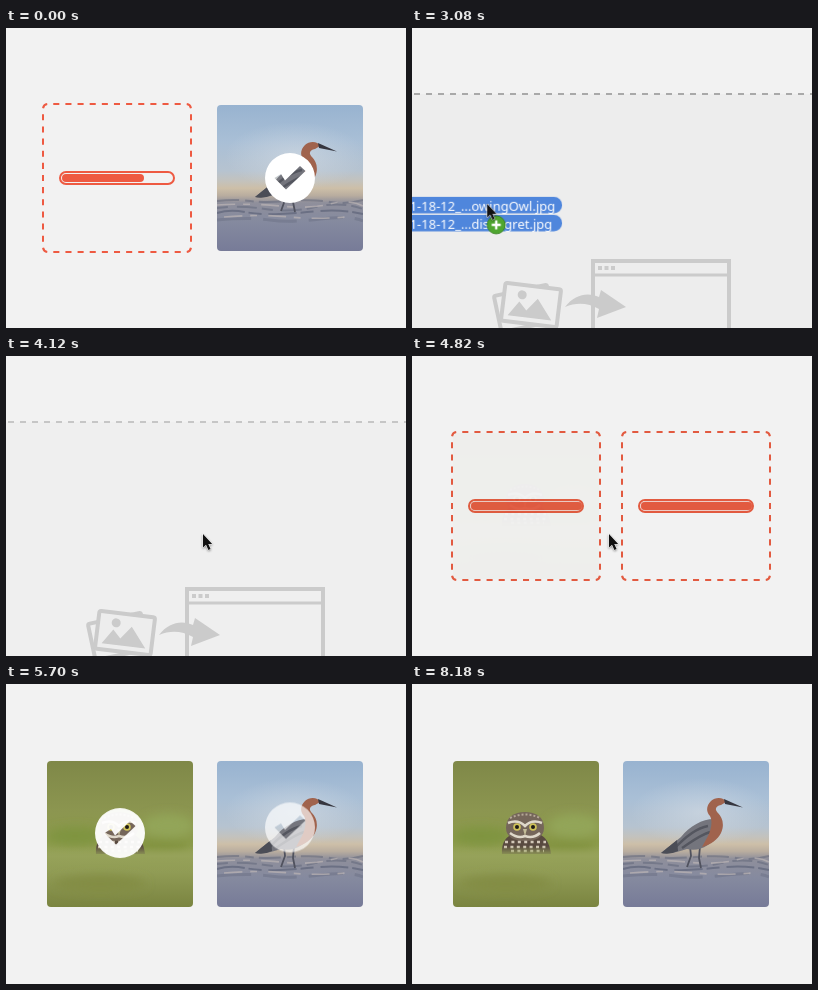
Write an HTML page that moves like this. It is 400 by 300 pixels and loops after 8.32 s.

```html
<!DOCTYPE html>
<html lang="en">
<head>
<meta charset="utf-8">
<title>Drag and drop upload</title>
<style>
  html, body { margin: 0; width: 100%; height: 100%; overflow: hidden; background: #f2f2f2; }
  svg { display: block; width: 400px; height: 300px; }
  text { font: 13px "Noto Sans", "Open Sans", sans-serif; fill: #fff; }

  .tile { --red: #e25a40; }
  .poster { --red: #ee5a42; }
  .outline { fill: none; stroke: var(--red); stroke-width: 2; }
  .dash { stroke-dasharray: 6 6; stroke-dashoffset: 6.8; }
  .fill { fill: var(--red); }
  .tile .fill { stroke: var(--red); stroke-width: .5; }
  .tile .dash { stroke: #d65f45; }

  .poster, .zone, .hint, .pointer, .drag, .slide, .frame, .photo, .mark, .tile .fill {
    animation: 8320ms linear infinite both;
  }
  .late * { animation-delay: 140ms; }

  .poster { animation-name: poster; }
  .zone { animation-name: zone; }
  .hint { animation-name: hint; }
  .pointer { animation-name: pointer; }
  .drag { animation-name: drag; }
  .slide { animation-name: slide; }
  .frame { animation-name: frame; }
  .photo { animation-name: photo; }
  .mark { animation-name: mark; }
  .tile .fill { animation-name: fill; }

  @keyframes poster {
    0%, 31% { opacity: 1; }
    31.01% { opacity: .93; }
    34.86%, 100% { opacity: 0; }
  }
  @keyframes zone {
    0%, 32.5% { opacity: 0; }
    35.82%, 48.56% { opacity: 1; }
    50.96%, 100% { opacity: 0; }
  }
  @keyframes hint {
    0%, 32.5% { opacity: 0; }
    35.82%, 50.96% { opacity: 1; }
    52.88%, 100% { opacity: 0; }
  }
  @keyframes pointer {
    0%, 31.01% { transform: translate(-90px, 240px); animation-timing-function: cubic-bezier(.3, .2, .5, 1); }
    43.03% { transform: translate(152px, 146px); animation-timing-function: ease-in-out; }
    48.08%, 61.3% { transform: translate(197px, 178px); opacity: 1; }
    62.98%, 100% { transform: translate(197px, 178px); opacity: 0; }
  }
  @keyframes drag {
    0%, 48.07% { opacity: 1; }
    48.08%, 100% { opacity: 0; }
  }
  @keyframes slide {
    0%, 50.48% { transform: translateY(40px); opacity: 0; animation-timing-function: ease-out; }
    52.88% { transform: translateY(-4px); opacity: 1; animation-timing-function: ease-in-out; }
    54.33%, 100% { transform: none; opacity: 1; }
  }
  @keyframes fill {
    0%, 52.16% { width: 8px; animation-timing-function: ease-in-out; }
    56.6%, 100% { width: 111px; }
  }
  @keyframes frame {
    0%, 61.3% { opacity: 1; }
    63.7%, 100% { opacity: 0; }
  }
  @keyframes photo {
    0%, 57.7% { opacity: 0; }
    64.66%, 100% { opacity: 1; }
  }
  @keyframes mark {
    0%, 64.78% { transform: translateY(-20px); opacity: 0; animation-timing-function: cubic-bezier(.5, 1, .89, 1); }
    69.59%, 85.34% { transform: none; opacity: 1; animation-timing-function: cubic-bezier(.11, 0, .5, 0); }
    89.9%, 100% { transform: translateY(20px); opacity: 0; }
  }
</style>
</head>
<body>
<svg viewBox="0 0 400 300">
  <defs>
    <clipPath id="crop"><rect x="-73" y="-73" width="146" height="146" rx="4"/></clipPath>
    <filter id="soft" x="-50%" y="-50%" width="200%" height="200%"><feGaussianBlur stdDeviation="5"/></filter>
    <filter id="fuzz" x="-20%" y="-20%" width="140%" height="140%"><feGaussianBlur stdDeviation=".6"/></filter>

    <linearGradient id="field" x2="0" y2="1">
      <stop offset="0" stop-color="#7f8848"/>
      <stop offset=".35" stop-color="#8c9650"/>
      <stop offset=".55" stop-color="#8b9a4a"/>
      <stop offset=".68" stop-color="#98a45c"/>
      <stop offset="1" stop-color="#7a8440"/>
    </linearGradient>
    <linearGradient id="grass" x2="0" y2="1">
      <stop offset="0" stop-color="#95a158" stop-opacity="0"/>
      <stop offset=".4" stop-color="#96a25a"/>
      <stop offset="1" stop-color="#8c974e" stop-opacity="0"/>
    </linearGradient>
    <linearGradient id="shore" x2="0" y2="1">
      <stop offset="0" stop-color="#98b3d0"/>
      <stop offset=".25" stop-color="#a9bfd6"/>
      <stop offset=".45" stop-color="#b6c3d0"/>
      <stop offset=".52" stop-color="#c3c2bd"/>
      <stop offset=".57" stop-color="#cdbfa8"/>
      <stop offset=".62" stop-color="#b9ad9f"/>
      <stop offset=".67" stop-color="#8f8f9b"/>
      <stop offset=".8" stop-color="#858a9f"/>
      <stop offset="1" stop-color="#777b98"/>
    </linearGradient>
    <radialGradient id="haze">
      <stop offset="0" stop-color="#d8dfe6" stop-opacity=".55"/>
      <stop offset="1" stop-color="#d8dfe6" stop-opacity="0"/>
    </radialGradient>

    <g id="owl" clip-path="url(#crop)">
      <rect x="-73" y="-73" width="146" height="146" fill="url(#field)"/>
      <g filter="url(#soft)">
        <ellipse cx="-45" cy="2" rx="28" ry="9" fill="#7f9440"/>
        <ellipse cx="48" cy="-8" rx="26" ry="12" fill="#93a558"/>
        <ellipse cx="40" cy="12" rx="30" ry="7" fill="#82933f"/>
        <ellipse cx="-20" cy="50" rx="46" ry="9" fill="#838d45"/>
      </g>
      <g filter="url(#fuzz)">
        <path d="M-24 20C-25 6-18-2 0-2S23 6 25 20Z" fill="#594a40"/>
        <path d="M-20-6C-20-17-12-22-1-22S18-17 18-6C18 3 10 7-1 7S-20 3-20-6Z" fill="#75665a"/>
        <path d="M-16-16Q-1-23 14-16" fill="none" stroke="#b5a897" stroke-width="2" stroke-dasharray="2 2"/>
        <path d="M-18-11Q-8-15-1-8Q6-15 16-11M-16-1Q-8 5-1 2Q7 5 14-1" fill="none" stroke="#dfd8ca" stroke-width="2.6"/>
        <path d="M-21 8H20M-22 13H22M-15 17H18" stroke="#d3c8b9" stroke-width="2.4" stroke-dasharray="3 3.4"/>
        <circle cx="-9" cy="-7" r="3.8" fill="#cfc25a"/><circle cx="7" cy="-7" r="3.8" fill="#cfc25a"/>
        <circle cx="-9" cy="-7" r="2" fill="#1d1a17"/><circle cx="7" cy="-7" r="2" fill="#1d1a17"/>
        <path d="M-3-5H1L-1 2Z" fill="#c3bc98"/>
      </g>
      <rect x="-73" y="12" width="146" height="26" fill="url(#grass)"/>
    </g>

    <g id="egret" clip-path="url(#crop)">
      <rect x="-73" y="-73" width="146" height="146" fill="url(#shore)"/>
      <ellipse cx="5" cy="-22" rx="70" ry="34" fill="url(#haze)"/>
      <g fill="none" stroke="#5f6479" stroke-width="2" filter="url(#fuzz)">
        <path d="M-73 23Q-55 21-40 23T0 23T40 24T73 22" opacity=".5" stroke-dasharray="22 6 9 5"/>
        <path d="M-73 35Q-60 31-45 34T-10 36T30 33T73 36" opacity=".7" stroke-dasharray="28 4 13 7"/>
        <path d="M-73 30Q-50 27-25 31T25 29T73 31" opacity=".5" stroke-dasharray="11 9 20 5"/>
        <path d="M-73 42Q-40 39-20 42T30 41T73 43" opacity=".35" stroke-width="3" stroke-dasharray="34 12"/>
        <path d="M-73 27Q-40 25-10 28T40 26T73 28M-66 39Q-30 36 0 39T66 38" stroke="#bdb6b6" stroke-width="1.6" opacity=".7" stroke-dasharray="18 8 7 11"/>
      </g>
      <g filter="url(#fuzz)">
        <path d="M-6 12L-5 22L-9 33M4 12L3 24L5 34" fill="none" stroke="#50525e" stroke-width="1.8"/>
        <path d="M18-15C6-15-6-8-15 3L-35 19C-26 21-17 17-9 15C4 18 16 11 21 0Z" fill="#74757d"/>
        <path d="M12-8C0-6-12 4-23 16M14-2C4 1-5 8-14 14" fill="none" stroke="#54565f" stroke-width="2.4"/>
        <path d="M-19 6L-35 19Q-26 21-18 17Z" fill="#4b4d56"/>
        <path d="M30-32C28-37 19-37 15-33C10-28 10-22 14-18C17-13 15-4 12 2L6 13C15 11 22 5 25-1C29-10 26-17 22-21C18-25 20-28 25-29Z" fill="#a0634d"/>
        <path d="M28-35L47-26.5L29-30Z" fill="#36363f"/>
      </g>
    </g>

    <path id="tick" fill="#fff" fill-rule="evenodd"
      d="M-25 0A25 25 0 1 1 25 0A25 25 0 1 1-25 0ZM-15.5 0L-9-4L-5 2.5L10-12L15.5-7L-4 11.5Z"/>

    <g id="box">
      <rect class="outline dash" x="-74" y="-74" width="148" height="148" rx="5" pathLength="576"/>
      <rect class="outline" x="-57" y="-6" width="114" height="12" rx="6"/>
    </g>

    <g id="file">
      <path d="M-106-7.5H-98L-94-3.5V7.5H-106Z" fill="#fafafa" stroke="#a2a2a2"/>
      <path d="M-98-7.5V-3.5H-94" fill="none" stroke="#a2a2a2"/>
      <circle cx="-100" cy="2" r="3.4" fill="#6f8cae"/>
      <path d="M-103 3L-100 0L-98 4" fill="none" stroke="#333f50"/>
      <rect x="-90" y="-8" width="165" height="16.5" rx="8.2" fill="#4f86dc"/>
    </g>
  </defs>

  <rect width="400" height="300" fill="#f2f2f2"/>

  <g class="zone">
    <rect y="66" width="400" height="234" fill="#ededed"/>
    <path d="M2 66H400" stroke="#a9a9a9" stroke-width="2" stroke-dasharray="6 6"/>
  </g>

  <g class="hint" fill="none" stroke="#cbcbcb" stroke-width="4">
    <path d="M181 304V233H317V304"/>
    <path d="M181 247H317" stroke-width="3"/>
    <path d="M186 240H203" stroke-dasharray="4 2.5"/>
    <rect x="-27" y="-18" width="54" height="37" rx="2" transform="translate(112 280) rotate(-12)"/>
    <g transform="translate(119 277) rotate(7)">
      <rect x="-28" y="-19" width="56" height="38" rx="2" fill="#ededed"/>
      <path d="M-22 13L-12-2L-4 6L6-7L22 13Z" fill="#cbcbcb" stroke="none"/>
      <circle cx="-10" cy="-9" r="4.5" fill="#cbcbcb" stroke="none"/>
    </g>
    <path d="M153 279C163 266 176 264 187 269L189 262L214 279L185 290L187 281C176 275 165 274 153 279Z" fill="#cbcbcb" stroke="none"/>
  </g>

  <g class="tile" transform="translate(114 150)">
    <g class="slide"><g class="frame">
      <use href="#box"/>
      <rect class="fill" x="-55" y="-4" width="111" height="8" rx="4"/>
    </g></g>
    <use class="photo" href="#owl"/>
    <use class="mark" href="#tick"/>
  </g>
  <g class="tile late" transform="translate(284 150)">
    <g class="slide"><g class="frame">
      <use href="#box"/>
      <rect class="fill" x="-55" y="-4" width="111" height="8" rx="4"/>
    </g></g>
    <use class="photo" href="#egret"/>
    <use class="mark" href="#tick"/>
  </g>

  <g class="pointer">
    <g class="drag">
      <use href="#file" y="1"/>
      <text x="-85" y="6.5">11-18-12_...owingOwl.jpg</text>
      <use href="#file" y="19"/>
      <text x="-85" y="24.5">11-18-12_...dishEgret.jpg</text>
      <circle cx="9" cy="21" r="9" fill="#4fa62f" stroke="#3b8423"/>
      <path d="M9 16.5V25.5M4.5 21H13.5" stroke="#fff" stroke-width="2.4"/>
    </g>
    <path d="M0 0V13.5L3 10.8L5.4 16L7.6 15L5.3 9.9H9.2Z" fill="#111" stroke="#fff" paint-order="stroke"
      style="filter: drop-shadow(0 1px 1px #0006)"/>
  </g>

  <g class="poster">
    <rect width="400" height="300" fill="#f2f2f2"/>
    <g transform="translate(111 150)">
      <use href="#box"/>
      <rect class="fill" x="-55" y="-4" width="82" height="8" rx="4"/>
    </g>
    <g transform="translate(284 150)">
      <use href="#egret"/>
      <use href="#tick"/>
    </g>
  </g>
</svg>
</body>
</html>
```
